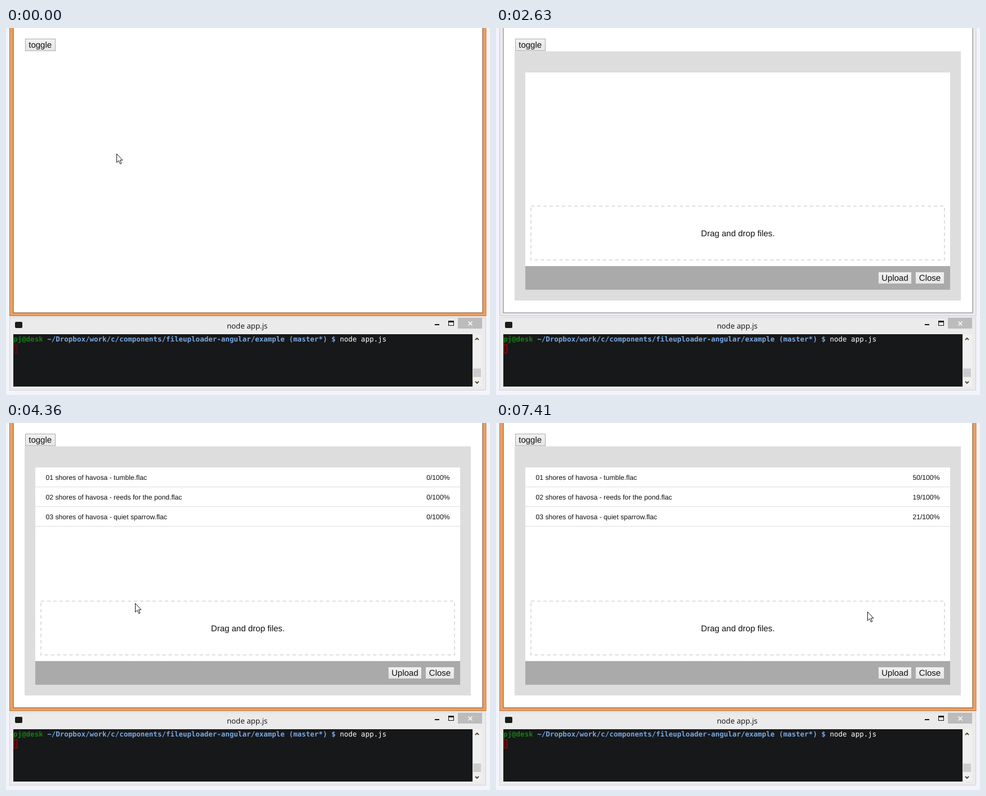
Write an HTML page that moves like this. It is 859x652 px and loops after 8000 ms.

```html
<!DOCTYPE html>
<html lang="en">
<head>
<meta charset="utf-8">
<title>File uploader</title>
<style>
  html, body { margin: 0; width: 100%; height: 100%; overflow: hidden; background: #f3f4fb; }
  svg { display: block; width: 859px; height: 652px; }
  text { font: 15px "Liberation Sans", Arial, sans-serif; fill: #111; white-space: pre; text-rendering: geometricPrecision; }
  .middle { text-anchor: middle; }
  .row text { font-size: 12.2px; }
  .row text + text { text-anchor: end; }
  .row path { stroke: #ddd; }
  .button rect { fill: url(#face); stroke: #acacac; }
  .button.hover rect { fill: url(#faceHover); stroke: #7eb4ea; }
  .frame { fill: #eb9f63; stroke: #b47a4c; }
  .page { fill: #fff; stroke: #a8744a; stroke-width: 1.5; }
  .inactive .frame { fill: #ebebee; stroke: #c6c6c9; }
  .inactive .page { stroke: #a0a0a0; }
  .title { font: 13.3px "Open Sans", sans-serif; }
  .terminal { font: 12.5px "DejaVu Sans Mono", monospace; fill: #fff; }
  .terminal .prompt { font-weight: bold; }
  .tip { font: 11.3px "Open Sans", sans-serif; fill: #1f63ae; }
  .badge { font: bold 11px "Open Sans", sans-serif; fill: #fff; }
  .pointer { fill: #fff; stroke: #111; stroke-linejoin: round; }
</style>
</head>
<body>
<svg viewBox="0 0 859 652">
  <defs>
    <linearGradient id="face" x2="0" y2="1">
      <stop stop-color="#f1f1f1"/><stop offset="1" stop-color="#e5e5e5"/>
    </linearGradient>
    <linearGradient id="faceHover" x2="0" y2="1">
      <stop stop-color="#ecf4fc"/><stop offset="1" stop-color="#dcecfc"/>
    </linearGradient>
    <linearGradient id="glass" x2=".6" y2="1">
      <stop stop-color="#e4f4fc" stop-opacity=".9"/>
      <stop offset=".45" stop-color="#f7fcff" stop-opacity=".9"/>
      <stop offset="1" stop-color="#cfe6f3" stop-opacity=".85"/>
    </linearGradient>
  </defs>

  <!-- browser window -->
  <g id="browser">
    <rect class="frame" x="6.5" y="-5" width="845.5" height="516.5"/>
    <rect class="page" x="13" y="-5" width="833" height="511"/>
  </g>
  <g id="toggle" class="button">
    <rect x="34.5" y="19.5" width="53" height="21"/>
    <text class="middle" x="60.7" y="35">toggle</text>
  </g>

  <g id="panel">
    <path fill="#ddd" d="M33 41.500H825V484H33z"/>
    <path fill="#fff" d="M52 79H806V423H52z"/>
    <path fill="#aaa" d="M52 423H806V465H52z"/>
    <rect id="dropzone" x="62" y="316.500" width="734" height="95.500" stroke="#ddd" stroke-width="2"/>
    <text class="middle" x="429.300" y="370">Drag and drop files.</text>
    <g id="upload" class="button">
      <rect x="678.5" y="433.5" width="59" height="21"/>
      <text class="middle" x="708" y="449">Upload</text>
    </g>
    <g class="button">
      <rect x="744.5" y="433.5" width="51" height="21"/>
      <text class="middle" x="770" y="449">Close</text>
    </g>
    <g id="rows"></g>
  </g>

  <!-- terminal window -->
  <rect x="6.5" y="514.5" width="845" height="129" fill="#ebebeb" stroke="#d3d3d7"/>
  <rect x="16" y="522" width="13" height="11" rx="2" fill="#1c1c18"/>
  <text class="title middle" x="428" y="534">node app.js</text>
  <path d="M761 526h8v2h-8zM785 520h10v9h-10zM786 523v5h8v-5z" fill="#111" fill-rule="evenodd"/>
  <path d="M802 515h43v19h-43z" fill="#bcbcbc"/>
  <path d="M820.500 521.500l7 7m0-7l-7 7" stroke="#fff" stroke-width="1.500"/>
  <path d="M13 544H828V637H13z" fill="#171819"/>
  <path d="M828 544H845V637H828z" fill="#f0f0f0"/>
  <path d="M829 605H843V620H829z" fill="#cdcdcd"/>
  <path d="M833 554l3-3 3 3M833 628l3 3 3-3" fill="none" stroke="#503c20" stroke-width="1.800"/>
  <text class="terminal" x="13" y="557"><tspan class="prompt"><tspan fill="#138013">pj@desk</tspan><tspan fill="#78a7e2"> ~/Dropbox/work/c/components/fileuploader-angular/example (master*) $</tspan></tspan> node app.js</text>
  <rect id="caret" x="14.500" y="562.500" width="5" height="15" fill="none" stroke-width="1.500"/>

  <!-- pointers, each with its hot spot at 0,0 -->
  <g id="drag">
    <rect x="-47" y="-85" width="98" height="98" rx="3" fill="#000" opacity=".22"/>
    <rect x="-48.500" y="-86.500" width="98" height="98" rx="2" fill="url(#glass)" stroke="#d5e8f1"/>
    <circle cy="-39" r="37" fill="#f58d1c"/>
    <rect x="-8.500" y="-46.500" width="15" height="15" rx="1" fill="#1d60b2" stroke="#e4edf7"/>
    <text class="badge middle" x="-1" y="-35">3</text>
    <rect x="10.500" y="12.500" width="53" height="18" fill="#fff" stroke="#828790"/>
    <path d="M14 20h5v-3.500l6 5-6 5V23h-5z" fill="#1b50a0"/>
    <text class="tip" x="29" y="26">Move</text>
  </g>
  <path id="arrow" class="pointer" d="M.5 .5V16l3.500-3.300 2.700 5.800 2.300-1-2.600-5.700H11z"/>
  <path id="hand" class="pointer" d="M-1.500 2Q-1.500 .5 0 .5T1.500 2V7Q4 6 4.500 8 7 7 7.500 9 10 8.500 10 11V15Q10 18 8 20V22H-1V20L-6 13.500Q-7 11.500-5.500 11T-1.500 13.500z"/>
</svg>

<script>
const LOOP = 8000, UPLOAD_START = 6210, UPLOAD_SPAN = 1200;
const $ = id => document.getElementById(id);

const files = [
  { name: "01 shores of havosa - tumble.flac", from: 5, to: 50 },
  { name: "02 shores of havosa - reeds for the pond.flac", from: 2, to: 19 },
  { name: "03 shores of havosa - quiet sparrow.flac", from: 3, to: 21 },
];

const steps = [
  [0, "arrow", 196, 223],
  [220, "arrow", 142, 130],
  [790, "hand", 76, 35],
  [1360, "hand", 76, 35],
  [1910, "arrow", 110, 190],
  [2630],
  [3210],
  [3780, "drag", 136, 350],
  [4360, "arrow", 229, 320],
  [4930, "arrow", 480, 385],
  [5530, "hand", 706, 438],
  [6210, "hand", 706, 438],
  [6810, "arrow", 684, 388],
  [7410, "arrow", 659, 335],
];

$("rows").innerHTML = files.map((file, i) => `
  <g class="row" transform="translate(0 ${79 + 35 * i})">
    <text x="70.5" y="22">${file.name}</text>
    <text class="percent" x="787.5" y="22"></text>
    <path d="M52 34.500H806"/>
  </g>`).join("");
const percents = document.querySelectorAll(".percent");

const show = (id, on) => $(id).style.display = on ? "" : "none";

function progress({ from, to }, start) {
  if (start < UPLOAD_START) return 0;
  return Math.round(from + (to - from) * (start - UPLOAD_START) / UPLOAD_SPAN);
}

function draw(time) {
  const [start, pointer, x, y] = steps.findLast(step => step[0] <= time);

  for (const id of ["arrow", "hand", "drag"]) show(id, id === pointer || (id === "arrow" && pointer === "drag"));
  for (const id of ["arrow", "hand", "drag"]) $(id).setAttribute("transform", `translate(${x ?? 0} ${y ?? 0})`);

  show("panel", start >= 1360);
  show("rows", start >= 4360);
  $("browser").classList.toggle("inactive", start === 2630);
  $("toggle").classList.toggle("hover", pointer === "hand" && y < 100);
  $("upload").classList.toggle("hover", pointer === "hand" && y > 400);
  $("dropzone").setAttribute("fill", pointer === "drag" ? "#ddd" : "none");
  $("dropzone").setAttribute("stroke-dasharray", pointer === "drag" ? "none" : "6 5");
  $("caret").setAttribute("stroke", start ? "#960808" : "#5c1012");
  files.forEach((file, i) => percents[i].textContent = `${progress(file, start)}/100%`);
}

const origin = performance.now();
function tick() {
  draw((performance.now() - origin) % LOOP);
  requestAnimationFrame(tick);
}
tick();
</script>
</body>
</html>
```
